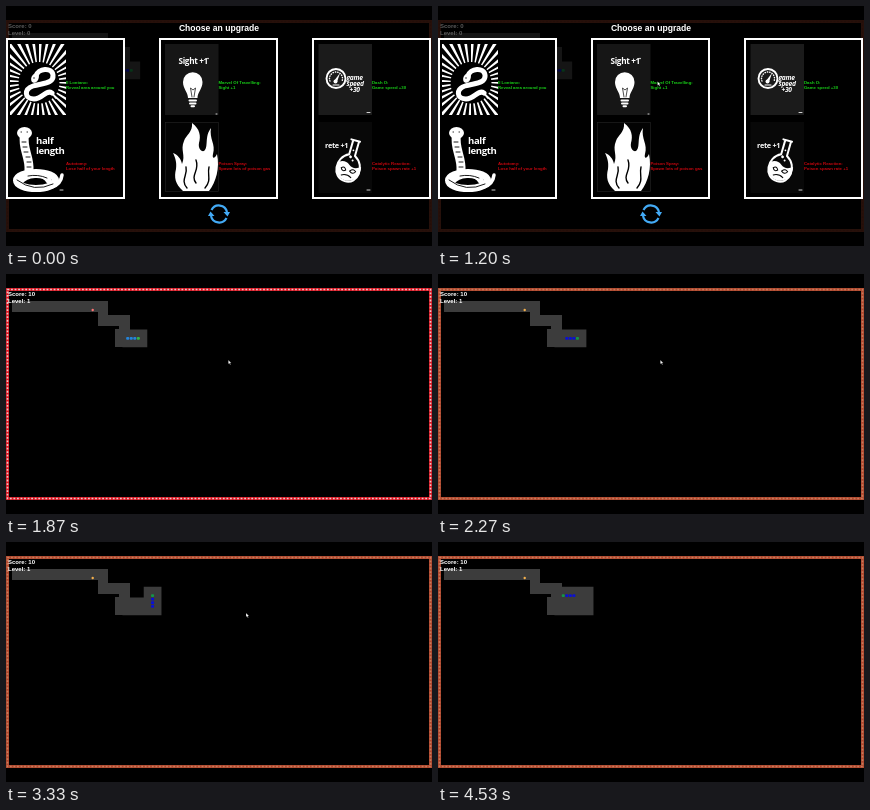
Recreate the animation shown at these times as an HTML page. Size 426 by 240 pixels, loop 4670 ms.

```html
<!DOCTYPE html>
<html lang="en">
<head>
<meta charset="utf-8">
<title>Snake upgrades</title>
<style>
  html, body { margin: 0; width: 100%; height: 100%; overflow: hidden; background: #000; }
  svg { display: block; width: 100vw; height: 100vh; }
  text { font-family: "Liberation Sans", Arial, sans-serif; font-weight: bold; fill: #fff; }
  .art text { font-family: "Open Sans", sans-serif; letter-spacing: -.04em; }
  .label text { font-size: 4.3px; }
  .good text { fill: #18d018; }
  .bad text { fill: #c8060e; }
  .line { fill: none; stroke: #fff; stroke-linecap: round; stroke-linejoin: round; }
  .ink { fill: none; stroke: #000; stroke-linecap: round; }
</style>
</head>
<body>
<svg viewBox="0 0 426 240">
  <defs>
    <clipPath id="panel"><rect x="4" y="38" width="56" height="71"/></clipPath>
  </defs>
  <rect width="426" height="240"/>

  <g id="game">
    <path id="lit" fill="#3c3c3c"/>
    <circle id="food" cx="86.7" cy="36" r="1.2"/>
    <g id="snake"></g>
    <g fill="none" stroke-width="3">
      <rect id="wall" x="1.5" y="15.5" width="423" height="209"/>
      <rect id="bricks" x="1.5" y="15.5" width="423" height="209" stroke-width="1.6" stroke-dasharray="1.8 1.75"/>
    </g>
    <text id="score" x="2" y="21.6" font-size="6"></text>
    <text id="level" x="2" y="28.8" font-size="6"></text>
  </g>

  <g id="menu">
    <text x="213" y="24.5" font-size="8.6" text-anchor="middle">Choose an upgrade</text>
    <g stroke="#fff" stroke-width="2">
      <rect x="1" y="33" width="117" height="159"/>
      <rect x="154" y="33" width="117" height="159"/>
      <rect x="307" y="33" width="117" height="159"/>
    </g>

    <g class="art" fill="#fff">
      <!-- coiled snake with rays -->
      <g clip-path="url(#panel)">
        <circle class="line" cx="33" cy="76" r="35" stroke-width="30" pathLength="72"
          stroke-dasharray=".8 1.2" style="stroke-linecap:butt"/>
      </g>
      <circle cx="33" cy="77" r="20.5" fill="#000"/>
      <path class="line" stroke-width="5" d="M30 70C32 62 46 61 47 69C48 78 36 77 27 80C18 83 18 93 28 93C37 93 40 83 46 87"/>
      <path class="line" stroke-width="2" d="M46 87L50 92"/>
      <ellipse cx="29" cy="72" rx="3.600" ry="5" transform="rotate(25 29 72)"/>
      <circle cx="28" cy="72" r=".7" fill="#000"/>

      <!-- cobra -->
      <path class="line" stroke-width="9" d="M18.500 129C16 143 24 150 23 165"/>
      <ellipse cx="18.500" cy="127" rx="7.500" ry="6"/>
      <path class="ink" stroke-width=".9" d="M15 126h.5M21 126h.5M16 136h4M17 141h4M18 146h4M20 151h4M21 156h4M21 161h4"/>
      <ellipse class="line" cx="30" cy="174.500" rx="19.500" ry="8" stroke-width="7"/>
      <path class="line" stroke-width="6" d="M14 176C20 168 38 166 43 175"/>
      <path class="line" stroke-width="3.500" d="M46 181Q55 178 56 169"/>
      <path class="ink" stroke-width=".9" d="M11 174Q28 187 47 178M22 170Q32 168 41 172"/>
      <text x="30" y="138.300" font-size="9.600">half</text>
      <text x="30" y="148" font-size="9.600">length</text>

      <!-- bulb -->
      <rect x="159" y="38" width="53.500" height="71" fill="#161616"/>
      <text x="172.500" y="58" font-size="8.200">Sight +1</text>
      <circle cx="202" cy="52.500" r=".8"/>
      <path d="M182 92C182 86 177 83 177 76A9.750 9.750 0 0 1 196.500 76C196.500 83 191.500 86 191.500 92Z"/>
      <path class="line" stroke-width="2" d="M183.500 94.500h6.500M184 97.500h5.500M185.500 100.300h2.500"/>
      <path class="ink" stroke-width=".7" d="M186 91L184.500 82L187 84L189.500 82L188 91"/>

      <!-- flames -->
      <rect x="159.300" y="116.300" width="53" height="69" fill="#030303" stroke="#262626" stroke-width=".6"/>
      <path d="M177 185C169 178 168 171 170 163C171 156 169 151 167 147C172 149 175 153 176 158C180 149 174 144 178 135C180 129 187 126 186 117C194 123 195 130 193 137C192 142 195 146 198 145C203 141 198 131 205 122C203 133 210 138 207 148C206 152 208 154 211 148C214 162 210 176 203 185Z"/>
      <path class="ink" stroke-width="1.400" d="M181 182C174 174 182 169 180 161M199 182C206 174 201 169 203 161M190 177C184 169 194 165 190 154"/>

      <!-- gauge -->
      <rect x="312.500" y="38" width="53.500" height="71" fill="#1b1b1b"/>
      <circle class="line" cx="330" cy="72.500" r="9.500" stroke-width="1.900"/>
      <path class="line" stroke-width="1.400" stroke-dasharray=".4 2" d="M324 75A6.500 6.500 0 1 1 336 75"/>
      <path d="M328 75L334 67L331 76Z"/>
      <circle cx="329.500" cy="75.500" r="2"/>
      <path class="line" stroke-width="1.200" d="M327 79h6"/>
      <g font-style="italic" font-size="6.700">
        <text x="340.500" y="73.500">game</text>
        <text x="340.500" y="79.700">speed</text>
        <text x="343.500" y="86.300">+30</text>
      </g>

      <!-- flask -->
      <rect x="312.500" y="116" width="53.500" height="71" fill="#080808"/>
      <text x="319" y="142" font-size="7.300">rete +1</text>
      <g transform="rotate(16 344 160)">
        <path class="line" stroke-width="2" d="M338 134h9M340 135V149C327 155 329 176 343 176S359 156 346 149V135"/>
        <path d="M332 159Q338 155 343 159T355 158C357 170 350 175 343 175S330 170 332 159Z"/>
        <path class="ink" stroke-width="1" d="M336 164q3-3 5 1q-3 3-5-1M345 165q3-4 6-1q-2 4-6 1M338 171q5-3 10 0"/>
        <circle cx="342" cy="151" r="1.400"/><circle cx="345" cy="154" r="1"/><circle cx="343" cy="144" r=".9"/>
      </g>
      <path class="line" stroke-width=".8" d="M210 108h1M361 106.500h3M54 184h3M361 184h3"/>
    </g>

    <g class="label good">
      <text x="60" y="77.6">Il Lontano:</text>
      <text x="60" y="82.6">Reveal area around you</text>
      <text x="212.5" y="77.6">Marvel Of Travelling:</text>
      <text x="212.5" y="82.6">Sight +1</text>
      <text x="366" y="77.6">Dash O:</text>
      <text x="366" y="82.6">Game speed +30</text>
    </g>
    <g class="label bad">
      <text x="60" y="159.3">Autotomy:</text>
      <text x="60" y="164.3">Lose half of your length</text>
      <text x="212.5" y="159.3">Poison Spray:</text>
      <text x="212.5" y="164.3">Spawn lots of poison gas</text>
      <text x="366" y="159.3">Catalytic Reaction:</text>
      <text x="366" y="164.3">Poison spawn rate +1</text>
    </g>

    <g fill="#43aaf5">
      <path fill="none" stroke="#43aaf5" stroke-width="2.2" d="M205.500 204A8.300 8.300 0 0 1 221 206M220.500 212A8.300 8.300 0 0 1 205 210"/>
      <path d="M217.500 206h6.500l-2.500 4.500ZM202 210h6.500l-4-4.500Z"/>
    </g>
  </g>

  <path id="cursor" d="M0 0V4L1 3.2L1.8 4.8L2.5 4.4L1.8 3H3Z" fill="#fff" stroke="#000" stroke-width=".25"/>
</svg>
<script>
const LOOP = 4670, START = 1865, SETTLE = 1930, CELL = 3.55, SIGHT = 2.5 * CELL;
const DIRS = { R: [1, 0], L: [-1, 0], U: [0, -1] };
const MOVES = 'RRRRRRRRRUUULLLLLL';
const TIMES = [0, 0, 0, START, START, 1930, 2265, 2325, 2665, 2725, 3065, 3265, 3465, 3665, 3865, 4065, 4265, 4465];
// Cursor stops: time, x, y
const STOPS = [[470, 217, 73], [670, 219.5, 75.5], [1200, 219.5, 75.5], [1670, 222.3, 86],
  [3060, 222.3, 86], [3330, 240, 71], [3460, 242, 69], [3720, 302, 14]];
const CAVE = 'M6 27H102V41H124V56H134V73H109V55H113V52H92V38H6Z';

const el = id => document.getElementById(id);
const paint = (id, attr, value) => el(id).setAttribute(attr, value);
const box = ([x, y]) => `M${x - SIGHT} ${y - SIGHT}h${2 * SIGHT}v${2 * SIGHT}h${-2 * SIGHT}Z`;

const trail = [[114.65, 64.3]];
for (const m of MOVES) {
  const [x, y] = trail[trail.length - 1], [dx, dy] = DIRS[m];
  trail.push([x + dx * CELL, y + dy * CELL]);
}

function drawSnake(t, fresh) {
  const head = TIMES.filter(at => at <= t).length;
  paint('lit', 'd', CAVE + trail.slice(3, head + 1).map(box).join(''));
  el('snake').innerHTML = trail.slice(head - 3, head + 1).map(([x, y], i) => {
    const color = i === 3 ? (fresh ? '#35b548' : '#159447') : (fresh ? '#2485dc' : '#0a10d4');
    return `<rect x="${x - 1.6}" y="${y - 1.4}" width="3.1" height="2.8" rx="1" fill="${color}"/>`;
  }).join('');
}

function drawCursor(t) {
  const i = STOPS.findIndex(s => s[0] > t);
  el('cursor').style.display = i > 0 ? '' : 'none';
  if (i < 1) return;
  const [t0, x0, y0] = STOPS[i - 1], [t1, x1, y1] = STOPS[i];
  const k = (t - t0) / (t1 - t0);
  paint('cursor', 'transform', `translate(${x0 + (x1 - x0) * k} ${y0 + (y1 - y0) * k})`);
}

function draw(t) {
  const playing = t >= START, fresh = playing && t < SETTLE;
  el('menu').style.display = playing ? 'none' : '';
  paint('game', 'opacity', playing ? 1 : 0.35);
  paint('wall', 'stroke', fresh ? '#d81824' : playing ? '#b0492f' : '#70301f');
  paint('bricks', 'stroke', fresh ? '#e8c8c8' : playing ? '#c77c5c' : '#64281a');
  paint('food', 'fill', fresh ? '#ff7474' : '#f5b04c');
  el('score').textContent = playing ? 'Score: 10' : 'Score: 0';
  el('level').textContent = playing ? 'Level: 1' : 'Level: 0';
  drawSnake(t, fresh);
  drawCursor(t);
}

function tick() {
  draw(performance.now() % LOOP);
  requestAnimationFrame(tick);
}
tick();
</script>
</body>
</html>
```
